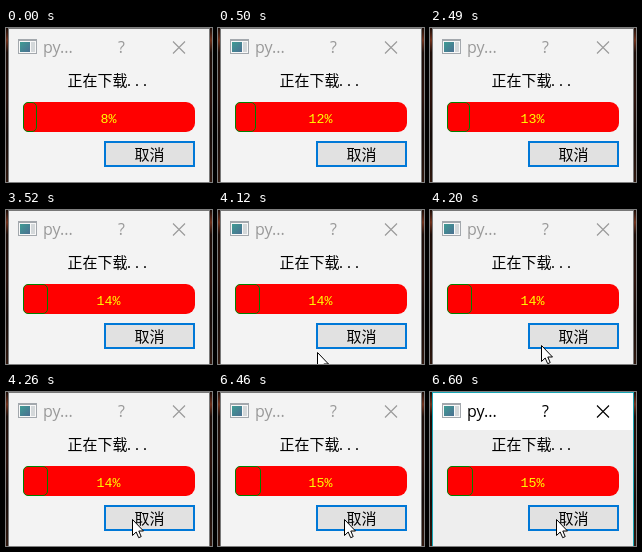
Recreate the animation shown at these times as an HTML page. Size 206x154 px, loop 8 s.

```html
<!DOCTYPE html>
<html lang="zh">
<meta charset="utf-8">
<title>下载进度</title>
<style>
  html, body { margin: 0; width: 100%; height: 100%; overflow: hidden; }
  svg { display: block; }
  text { font-family: "Noto Sans CJK SC", "Noto Sans CJK", sans-serif; font-size: 15px; font-weight: 300; }
  .latin { font-family: "Open Sans", "Noto Sans", sans-serif; font-size: 16px; font-weight: 400; }
  .mono { font-family: "Liberation Mono", monospace; font-size: 13.3px; font-weight: 400; }
  .window { --title: #f3f3f3; --body: #f3f3f3; --ink: #999; --edge: #777; }
  .window.active { --title: #fff; --body: #eee; --ink: #000; --edge: #16a5b5; }
</style>
<svg width="206" height="154" viewBox="0 0 206 154">
  <defs>
    <linearGradient id="desk" x2="0" y2="1">
      <stop stop-color="#1c0d08"/><stop offset=".08" stop-color="#70301a"/>
      <stop offset=".16" stop-color="#1c0d08"/><stop offset=".45" stop-color="#2a1009"/>
      <stop offset=".7" stop-color="#150b08"/><stop offset="1" stop-color="#30180e"/>
    </linearGradient>
    <linearGradient id="pane" x2="1" y2="1">
      <stop stop-color="#3f9c94"/><stop offset="1" stop-color="#4b6f91"/>
    </linearGradient>
  </defs>
  <rect width="206" height="154" fill="url(#desk)"/>

  <g id="win" class="window">
    <path d="M2 0H204V154H2Z" fill="var(--edge)"/>
    <path d="M3 1H203V38H3Z" fill="var(--title)"/>
    <path d="M3 38H203V154H3Z" fill="var(--body)"/>

    <g shape-rendering="crispEdges">
      <path d="M12 11H31V26H12Z" fill="#a3a8ad"/>
      <path d="M13 13H30V25H13Z" fill="#f8f8f8"/>
      <path d="M14 14H24V24H14Z" fill="url(#pane)"/>
      <path d="M25 14H29V24H25Z" fill="#d4d8da"/>
    </g>
    <g fill="var(--ink)">
      <text class="latin" x="37" y="25">py...</text>
      <text class="latin" x="112" y="25">?</text>
    </g>
    <path d="M167 13.5 179 25.5M179 13.5 167 25.5" stroke="var(--ink)" stroke-width="1.1"/>

    <text x="61.5" y="58">正在下载<tspan class="mono" dx="-2.5">...</tspan></text>

    <rect x="17" y="74" width="172" height="30" rx="9" fill="#f00"/>
    <rect id="chunk" x="17.5" y="74.5" height="29" rx="4.5" fill="#f00" stroke="#008000"/>
    <text id="percent" class="mono" x="102.5" y="94.5" text-anchor="middle" fill="#ff0"></text>

    <rect x="99" y="114" width="89" height="24" fill="#e1e1e1" stroke="#0078d7" stroke-width="2"/>
    <text x="128.5" y="132">取消</text>
  </g>

  <path id="cursor" d="M.5 .5V16.5L4.2 13 6.7 18.7 9.2 17.6 6.8 12H11.5Z" fill="#fff" stroke="#000"/>
</svg>
<script>
  const LOOP = 8000;
  const BAR_WIDTH = 172;
  // start time, percent
  const progress = [[0, 8], [500, 12], [2490, 13], [3520, 14], [6460, 15]];
  // start time, pointer tip
  const pointer = [
    [4040, 81, 150],
    [4080, 90, 147],
    [4120, 99, 142],
    [4170, 111, 135],
    [4210, 120, 130],
    [4260, 126, 127]
  ];
  const el = id => document.getElementById(id);
  const current = (steps, t) => steps.filter(s => s[0] <= t).pop();

  function draw(t) {
    const [, value] = current(progress, t);
    el('percent').textContent = value + '%';
    el('chunk').setAttribute('width', Math.floor(BAR_WIDTH * value / 100));

    const tip = current(pointer, t);
    el('cursor').style.display = tip ? '' : 'none';
    if (tip) el('cursor').setAttribute('transform', `translate(${tip[1]} ${tip[2]})`);

    el('win').classList.toggle('active', t >= 6600);
  }

  function tick() {
    draw(performance.now() % LOOP);
    requestAnimationFrame(tick);
  }
  tick();
</script>
</html>
```
